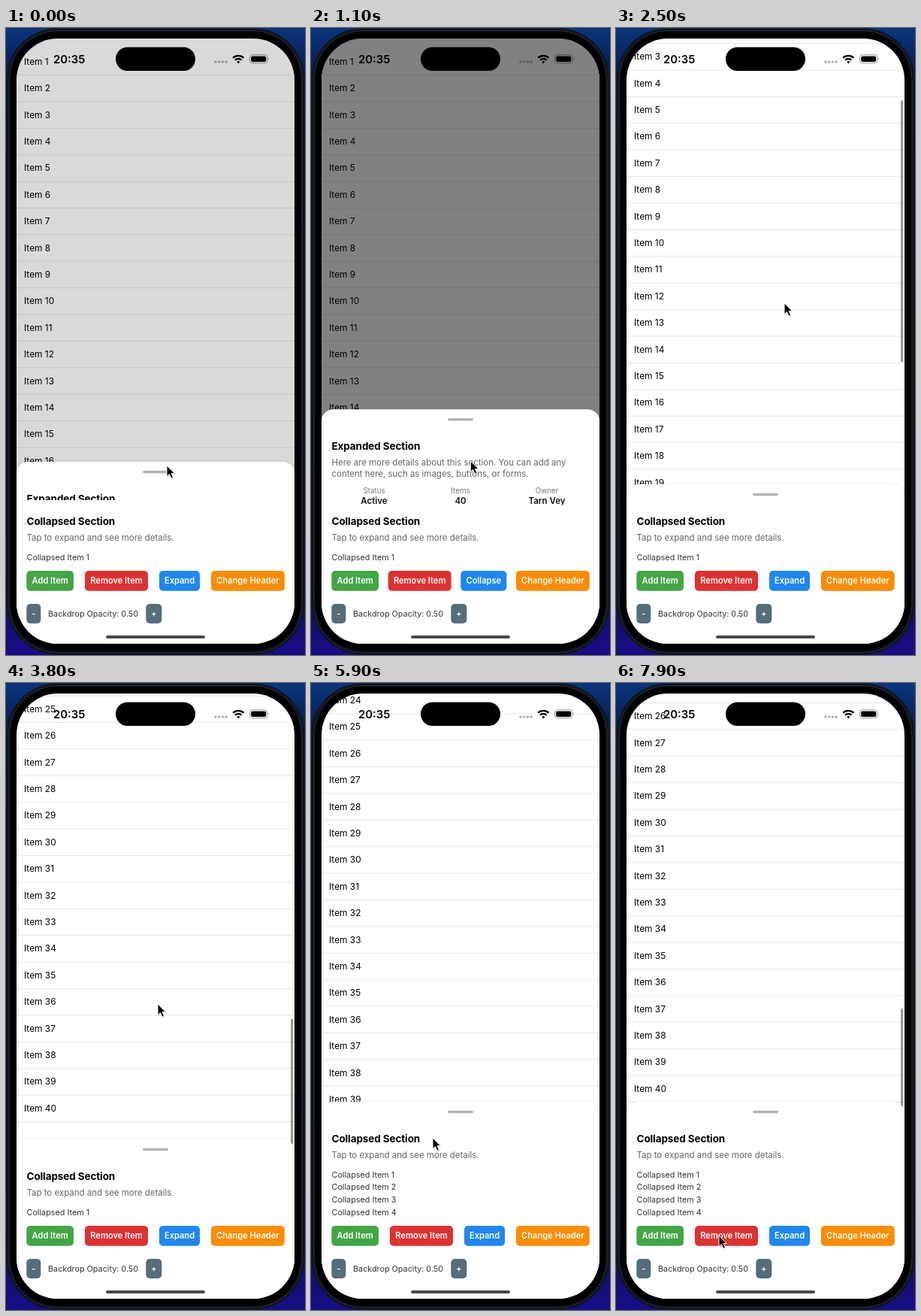
Write an HTML page that moves like this. It is 398x834 px and loops after 8 s.

```html
<!DOCTYPE html>
<html lang="en">
<head>
<meta charset="utf-8">
<title>Bottom sheet</title>
<style>
  html, body { margin: 0; width: 100%; height: 100%; overflow: hidden; background: #000; }
  svg { display: block; width: 398px; height: 834px; font-family: Inter, "Liberation Sans", sans-serif; }
  text { white-space: pre; }
  .row { font-size: 11.9px; }
  .title { font-size: 13.5px; font-weight: 700; letter-spacing: -.1px; }
  .note { font-size: 11.5px; fill: #666; letter-spacing: -.02px; }
  .item { font-size: 10.8px; fill: #333; }
  .btn { font-size: 11.1px; font-weight: 600; fill: #fff; text-anchor: middle; }
  .label { font-size: 9.8px; fill: #777; text-anchor: middle; }
  .value { font-size: 11.5px; font-weight: 600; fill: #111; text-anchor: middle; }
  .clock { font-size: 14.9px; font-weight: 600; }
  #sheet { filter: drop-shadow(0 -1px 2px rgba(0, 0, 0, .05)); }
</style>
</head>
<body>
<svg viewBox="0 0 398 834">
  <defs>
    <linearGradient id="desk" x1="0" y1="0" x2="0" y2="1">
      <stop offset="0" stop-color="#0a357c"/>
      <stop offset=".07" stop-color="#0a1a50"/>
      <stop offset=".25" stop-color="#070d22"/>
      <stop offset=".52" stop-color="#081212"/>
      <stop offset=".78" stop-color="#0a0c28"/>
      <stop offset="1" stop-color="#180e88"/>
    </linearGradient>
    <clipPath id="screen"><rect x="14" y="14" width="370" height="805" rx="55"/></clipPath>
  </defs>

  <rect width="398" height="834" fill="url(#desk)"/>
  <rect x="1" y=".5" width="396" height="833" rx="67" fill="#10151d"/>
  <rect x="4" y="3.5" width="390" height="827" rx="65" fill="#05070b" stroke="#2b323c"/>
  <rect x="7" y="7" width="384" height="820" rx="62" fill="#000"/>

  <g clip-path="url(#screen)">
    <rect x="14" y="14" width="370" height="805" fill="#fff"/>
    <g id="list"></g>
    <rect id="bar" x="379.3" width="2.5" height="348" rx="1.25" fill="#000" fill-opacity=".48"/>
    <rect id="dim" x="14" y="14" width="370" height="805"/>

    <g id="sheet">
      <rect x="14" y="-.5" width="370" height="420" rx="15.5" fill="#fff"/>
      <rect x="182" y="11.3" width="34" height="3.5" rx="1.75" fill="#b4b4b4"/>
      <g id="details"></g>
    </g>
    <rect id="cover" x="14" width="370" height="400" fill="#fff"/>
    <g id="brief"></g>
    <g id="actions"></g>
    <rect x="133" y="808" width="132" height="4" rx="2" fill="#484848"/>

    <text class="clock" x="63" y="46.6">20:35</text>
    <rect x="146" y="25.5" width="106" height="31.5" rx="15.75"/>
    <g id="dots" fill-opacity=".3"></g>
    <g fill="none" stroke="#000" stroke-width="2.3">
      <path d="M302.2 39.8a10 10 0 0 1 14.2 0M305 42.8a6 6 0 0 1 8.6 0"/>
      <path d="M307.2 45.1a3 3 0 0 1 4.2 0L309.3 47.2z" fill="#000" stroke="none"/>
    </g>
    <rect x="324.5" y="35.7" width="23.5" height="11" rx="3.6" fill="none" stroke="#000" stroke-opacity=".4"/>
    <rect x="326.2" y="37.4" width="20" height="7.6" rx="2.2"/>
    <path d="M349.3 39.4q1.6 1.8 0 3.7z" fill-opacity=".45"/>
  </g>

  <g id="cursor">
    <path d="M1 2V16.2L4.4 13L6.8 18.4L9.3 17.3L6.9 12.1H11.4Z" fill-opacity=".2"/>
    <path d="M0 0V14.6L3.4 11.5L5.8 17.1L8.5 15.9L6.1 10.6H10.6Z" stroke="#fff" stroke-linejoin="round"/>
  </g>
</svg>
<script>
const LOOP = 8000, STEP = 100;
const PITCH = 35.4, FULL = 101, LINE = 16.67;
const $ = id => document.getElementById(id);

function add(parent, tag, attrs, text) {
  const el = document.createElementNS("http://www.w3.org/2000/svg", tag);
  for (const k in attrs) el.setAttribute(k, attrs[k]);
  if (text) el.textContent = text;
  return parent.appendChild(el);
}
const write = (parent, kind, x, y, s) => add(parent, "text", { class: kind, x, y }, s);

function button(x, y, w, h, color, label) {
  const g = add($("actions"), "g", {});
  add(g, "rect", { x, y, width: w, height: h, rx: 5, fill: color });
  write(g, "btn", x + w / 2, y + h / 2 + 4, label);
  return g;
}

for (let i = 0; i < 40; i++) {
  write($("list"), "row", 24, 48.8 + i * PITCH, "Item " + (i + 1));
  add($("list"), "rect", { x: 14, y: 62 + i * PITCH, width: 370, height: 1, fill: "#e6e6e6" });
}

write($("details"), "title", 27.5, 53.3, "Expanded Section");
write($("details"), "note", 27.5, 74.6, "Here are more details about this section. You can add any");
write($("details"), "note", 27.5, 89, "content here, such as images, buttons, or forms.");
[["Status", "Active"], ["Items", "40"], ["Owner", "Tarn Vey"]].forEach(([name, value], i) => {
  const x = 84 + i * 115;
  write($("details"), "label", x, 111.6, name);
  write($("details"), "value", x, 125, value);
});

write($("brief"), "title", 27.5, 660.8, "Collapsed Section");
write($("brief"), "note", 27.5, 682, "Tap to expand and see more details.");
const items = [0, 1, 2, 3].map(i =>
  write($("brief"), "item", 27.5, 707.8 + i * LINE, "Collapsed Item " + (i + 1)));

button(27.3, 722, 62.7, 26.7, "#43a546", "Add Item");
const remove = button(105, 722, 84, 26.7, "#e03131", "Remove Item");
const expand = button(204, 722, 54, 26.7, "#1f87f2", "Expand");
const collapse = button(199.3, 722, 61, 26.7, "#1f87f2", "Collapse");
button(273, 722, 97.8, 26.7, "#fd8c00", "Change Header");
button(27.3, 766, 19, 26, "#546e7a", "-");
button(186.3, 766, 21, 26, "#546e7a", "+");
write($("actions"), "item", 56, 783, "Backdrop Opacity: 0.50");

for (let i = 0; i < 4; i++) add($("dots"), "circle", { cx: 279 + i * 4.7, cy: 45, r: 1.8 });

// Eased progress from 0 to 1 between two times
function ease(t, from, to) {
  const p = Math.min(1, Math.max(0, (t - from) / (to - from)));
  return p * p * (3 - 2 * p);
}

// The sheet settles open, then is dragged shut
const openAt = t => t < 1000
  ? FULL - 71 * Math.exp(-t / 121)
  : FULL * (1 - ease(t, 1050, 1800));

// Each click on "Add Item" makes room for one line
const clicks = [4600, 4900, 5200];
const growAt = t => LINE * clicks.reduce((sum, c) => sum + ease(t, c, c + 200), 0);

// Scroll past the end, bounce back, then reveal the rest
const scrollAt = t =>
  859.6 * ease(t, 2205, 3800) - 23.6 * ease(t, 3800, 4200) + 49.6 * ease(t, 6400, 7200);
const barAt = t => ease(t, 2100, 2200) - ease(t, 4500, 4800) + ease(t, 6400, 6500);

// Pointer stops: time, x, y
const stops = [
  [0, 214, 582], [300, 242, 497], [1500, 202, 603.5], [2500, 224, 366], [3800, 202, 427],
  [4400, 62, 732], [5400, 62, 732], [5900, 162, 605], [6600, 207, 380], [7900, 137, 735]
];
function pointerAt(t) {
  const [start, ...rest] = stops;
  let [time, x, y] = start;
  for (const [nt, nx, ny] of rest) {
    const p = ease(t, time, nt);
    x += (nx - x) * p;
    y += (ny - y) * p;
    if (t <= nt) break;
    time = nt;
  }
  return [x, y];
}

const move = (el, x, y) => el.setAttribute("transform", `translate(${x} ${y})`);
const show = (el, on) => el.setAttribute("visibility", on ? "visible" : "hidden");

function draw(t) {
  const open = openAt(t), grow = growAt(t), scroll = scrollAt(t);
  const isOpen = t >= 200 && t < 1400;

  move($("list"), 0, -scroll);
  move($("bar"), 0, 61.5 + scroll * (0.4485 - 0.00058 * grow));
  $("bar").setAttribute("opacity", barAt(t));
  $("dim").setAttribute("opacity", 0.5 * open / FULL);

  move($("sheet"), 0, 607.5 - open - grow);
  move($("cover"), 0, 625.2 + 0.0923 * open - grow);
  move($("brief"), 0, -grow);
  items.forEach((el, i) => show(el, grow >= i * LINE - 8));

  move(remove, isOpen ? -2.3 : 0, 0);
  show(expand, !isOpen);
  show(collapse, isOpen);
  move($("cursor"), ...pointerAt(t));
}

const start = performance.now();
function frame() {
  const t = (performance.now() - start) % LOOP;
  draw(Math.floor(t / STEP) * STEP);
  requestAnimationFrame(frame);
}
frame();
</script>
</body>
</html>
```
